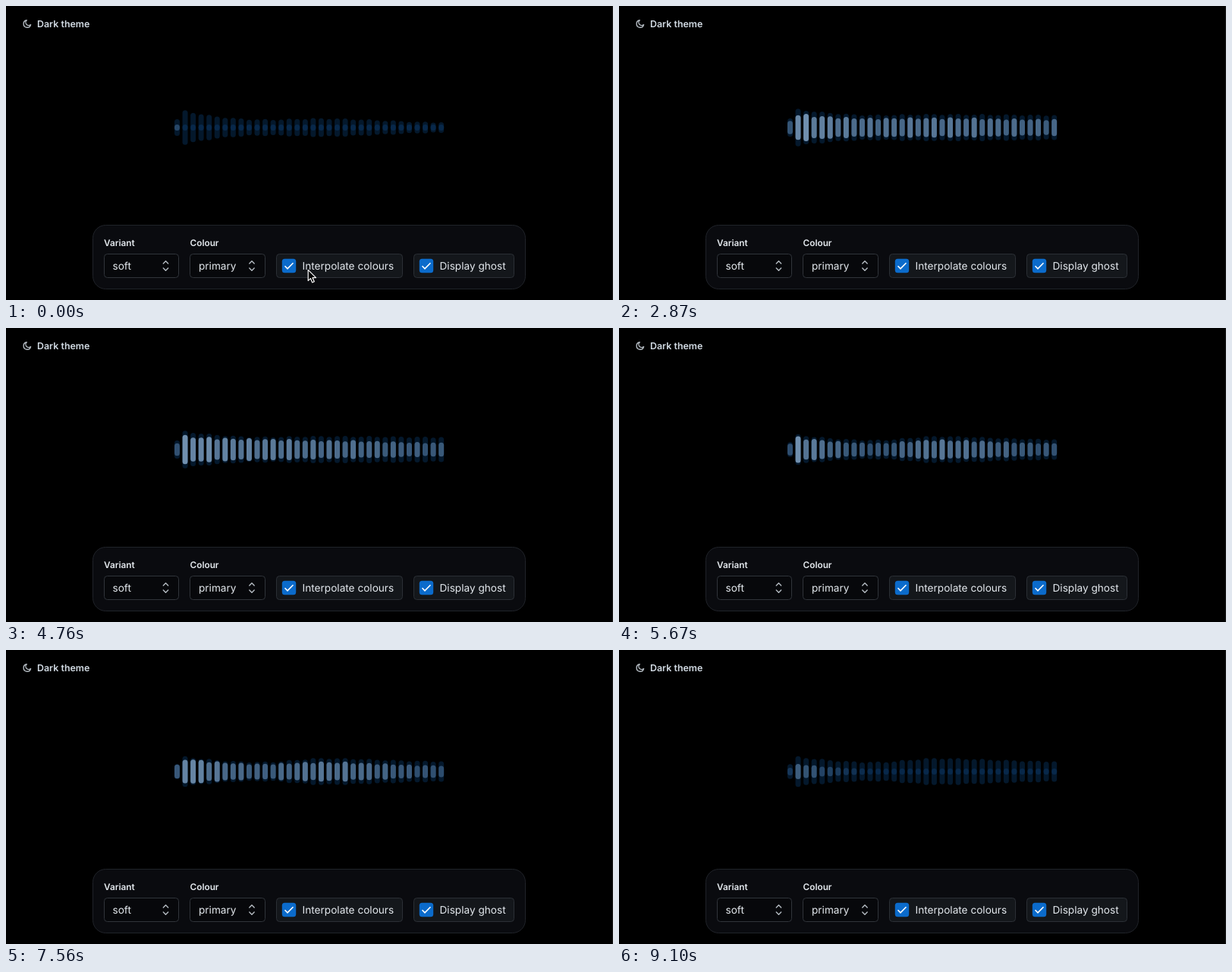
An HTML page that plays this animation: 800 by 387 pixels, repeating every 9.17 s.

```html
<!DOCTYPE html>
<html lang="en">
<head>
<meta charset="utf-8">
<title>Voice visualiser</title>
<style>
  html, body { margin: 0; width: 100%; height: 100%; overflow: hidden; background: #000; }
  svg { display: block; width: 100%; height: 100%; }
  text { font: 400 13.63px Inter, sans-serif; fill: #e4e9ee; text-rendering: geometricPrecision; }
  .label { font-weight: 600; font-size: 11.8px; }
  .title { font-weight: 600; font-size: 12.45px; fill: #d3dce5; }
  .line { fill: none; stroke: #b4bbc2; stroke-width: 1.4; stroke-linecap: round; stroke-linejoin: round; }
  .select { fill: #07080b; stroke: #30343a; }
  .toggle { fill: #14171b; stroke: #2b2f35; }
  .tick { fill: none; stroke: #fff; stroke-width: 1.6; }
</style>
</head>
<body>
<svg viewBox="0 0 800 387">
  <defs>
    <path id="chevrons" class="line" d="M-3.2 -3 L0 -6.2 L3.2 -3 M-3.2 3 L0 6.2 L3.2 3"/>
    <g id="checkbox">
      <rect width="18.4" height="18.4" rx="3.5" fill="#0b6bcb"/>
      <path class="tick" d="M3.7 9.5 L7.2 13 L14.7 5.5"/>
    </g>
  </defs>
  <rect width="800" height="387"/>
  <rect x="799" width="1" height="387" fill="#1c1c1c"/>

  <path class="line" d="M27.3 18.7 A4.8 4.8 0 1 0 32.6 24.6 A3.7 3.7 0 0 1 27.3 18.7 Z"/>
  <text class="title" x="41" y="28">Dark theme</text>

  <g id="ghosts" fill="#04182c"></g>
  <g id="bars"></g>

  <rect x="114.5" y="288.5" width="570" height="84" rx="17" fill="#0a0b0f" stroke="#202329"/>
  <text class="label" x="129" y="316">Variant</text>
  <text class="label" x="242.5" y="316">Colour</text>
  <rect class="select" x="129.5" y="326.5" width="98" height="31" rx="4"/>
  <rect class="select" x="242.5" y="326.5" width="99" height="31" rx="4"/>
  <text x="140.5" y="347">soft</text>
  <text x="254" y="347">primary</text>
  <use href="#chevrons" x="210.5" y="342"/>
  <use href="#chevrons" x="324" y="342"/>
  <rect class="toggle" x="356.5" y="326.5" width="166" height="31" rx="4"/>
  <rect class="toggle" x="537.5" y="326.5" width="132" height="31" rx="4"/>
  <use href="#checkbox" x="363.8" y="332.8"/>
  <use href="#checkbox" x="544.8" y="332.8"/>
  <text x="390.5" y="347">Interpolate colours</text>
  <text x="571.5" y="347">Display ghost</text>

  <path id="cursor" fill="#000" stroke="#fff" stroke-width="1.2" stroke-linejoin="round"
    d="M398.2 347.4 v14.2 l3.2 -3 2.3 5.3 2.6 -1.1 -2.3 -5.1 h4.5 z"/>
</svg>
<script>
const LOOP = 9170, STEP = 70, COUNT = 34, MIN = 8;
const clamp = (v, lo, hi) => Math.min(hi, Math.max(lo, v));
const mix = (a, b, u) => a + (b - a) * u;
const smooth = u => u * u * (3 - 2 * u);

// A spectrum is four heights: bass peak, dip after it, voice band, treble end.
const silence = [MIN, MIN, MIN, MIN];
const fading = [20, MIN, MIN, MIN];
const earlyPeaks = [44, 21, 24, 14];
const loudPeaks = [48, 33, 35, 33];
const latePeaks = [39, 25, 35, 27];

const levelKeys = [
  [0, silence], [1540, silence],
  [1960, [35, 13, 16, 7]],
  [2800, [36, 25, 26, 22]],
  [3640, [21, 15, 16, 12]],
  [4760, [35, 27, 24, 18]],
  [5180, silence],
  [5670, [32, 17, 25, 17]],
  [7560, [34, 20, 25, 16]],
  [8600, [30, 19, 24, 17]],
  [9100, fading], [LOOP, fading]
];
const ghostKeys = [
  [0, earlyPeaks], [2100, earlyPeaks], [2800, loudPeaks],
  [5180, loudPeaks], [5320, latePeaks], [LOOP, latePeaks]
];

function spectrumAt(keys, t) {
  const k = keys.findIndex(([time]) => time > t);
  const [t0, a] = keys[k - 1], [t1, b] = keys[k];
  return a.map((h, j) => mix(h, b[j], (t - t0) / (t1 - t0)));
}

function barHeight([bass, dip, voice, treble], i) {
  if (i === 0) return Math.max(MIN, bass * 0.5);
  if (i < 11) return mix(dip, bass, (1 - (i - 1) / 10) ** 2);
  if (i < 18) return mix(dip, voice, smooth((i - 11) / 7));
  return mix(voice, treble, smooth((i - 18) / 15));
}

function makeBars(id) {
  const group = document.getElementById(id);
  return Array.from({ length: COUNT }, (_, i) => {
    const bar = document.createElementNS(group.namespaceURI, 'rect');
    bar.setAttribute('x', 222 + i * 10.55);
    bar.setAttribute('width', 7);
    bar.setAttribute('rx', 3.5);
    return group.appendChild(bar);
  });
}

function setHeight(bar, height) {
  bar.setAttribute('y', 160 - height / 2);
  bar.setAttribute('height', height);
}

const dim = [8, 40, 74], bright = [112, 143, 174];
const colour = u => `rgb(${dim.map((c, k) => Math.round(mix(c, bright[k], u)))})`;

const ghosts = makeBars('ghosts'), bars = makeBars('bars');
const cursor = document.getElementById('cursor');

function draw(t) {
  const levels = spectrumAt(levelKeys, t), peaks = spectrumAt(ghostKeys, t);
  const fade = clamp(1 - t / 280, 0, 1);
  bars.forEach((bar, i) => {
    const level = barHeight(levels, i);
    const flutter = 0.14 * (level - MIN) * Math.sin(i * 2.4 + t / 130);
    const height = Math.max(MIN, level + flutter);
    const glow = clamp((height - MIN) / 27, 0, 1) ** 0.8;
    setHeight(bar, height);
    bar.setAttribute('fill', colour(i ? glow : Math.max(glow, 0.3 * fade)));
    setHeight(ghosts[i], Math.max(barHeight(peaks, i) + 1.5 * Math.sin(i * 1.9), height));
  });
  cursor.setAttribute('opacity', fade);
}

let start;
function tick(now) {
  start ??= now;
  const t = (now - start) % LOOP;
  draw(Math.floor(t / STEP) * STEP);
  requestAnimationFrame(tick);
}
draw(0);
requestAnimationFrame(tick);
</script>
</body>
</html>
```
